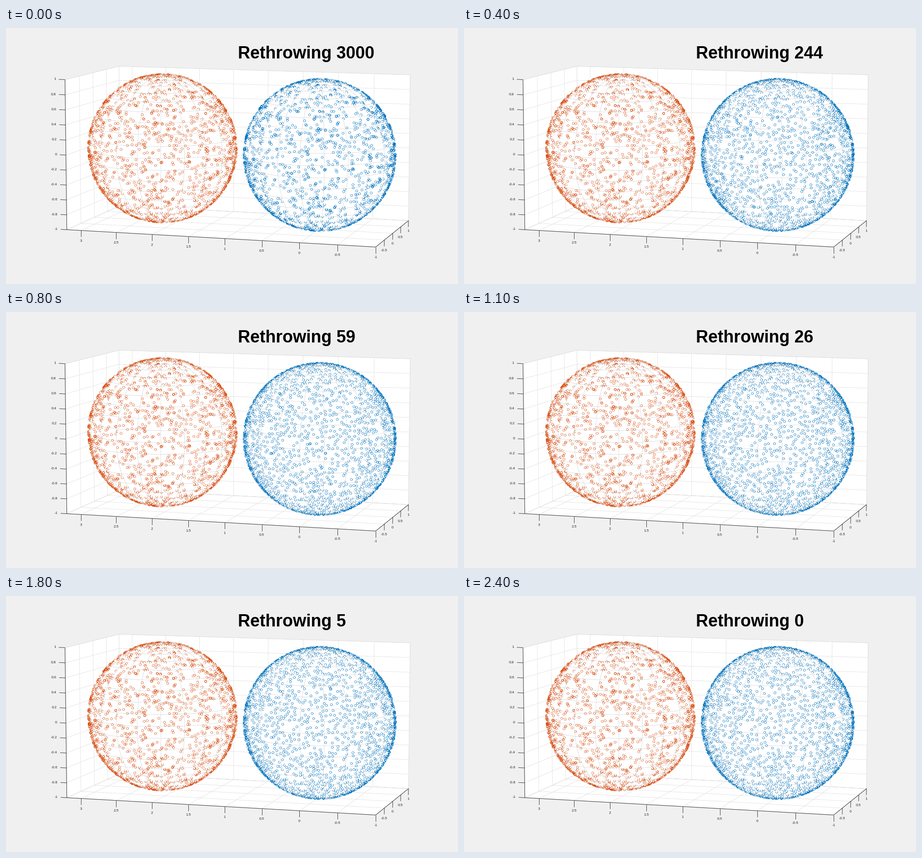
Write a matplotlib script that moves like this. It is 994 by 563 pixels and loops after 2.5 s.

```python
import numpy as np
import matplotlib.pyplot as plt
from matplotlib.animation import FuncAnimation
from matplotlib.collections import LineCollection, PolyCollection

W, H, DPI = 994, 563, 64
PX = 72 / DPI  # one pixel in points
INK, GRID, MESH = "#262626", "#dfdfdf", "#dcdcdc"
ORANGE, BLUE = "#d95319", "#0072bd"
X_MIN, X_MAX = -1, 3.2
MARKER, MARKER_LW = 2.45, 0.66
SINK = 0.997  # keeps the ball's facets just behind the markers
N = 3000
# Points thrown again at each step
COUNTS = [N, 1004, 525, 351, 244, 169, 119, 84, 59, 44, 34, 26, 20,
          15, 12, 9, 7, 6, 5, 4, 3, 2, 2, 1, 0]

# x, y, z of known places in the box and where they sit on the stage
ANCHORS = [
    (3, -1, -1, 164, 445), (2, -1, -1, 321, 453.6), (1, -1, -1, 480.8, 462.5),
    (0, -1, -1, 644.6, 471.7), (-1, -1, -1, 812.3, 481.2), (-1, 0, -1, 850, 451),
    (-1, 1, -1, 884.5, 423.2), (3.2, -1, -1, 133.2, 443), (3.2, -1, 0, 131.2, 278.3),
    (3.2, -1, 1, 129.2, 113.5), (3.2, 1, 1, 248, 83.5), (2, 1, 1, 425, 88.7),
    (1, 1, 1, 576, 93.2), (0, 1, 1, 730, 97.8), (-1, 1, 1, 889, 102.5),
    (0, 0, 0, 689.8, 278.4), (2.2, 0, 0, 344, 264.3),
]

plt.rcParams["path.simplify"] = False
plt.rcParams["font.family"] = "Liberation Sans"


def solve_camera(anchors):
    """Least-squares perspective matrix (3 x 4)."""
    rows, rhs = [], []
    for x, y, z, u, v in anchors:
        rows.append([x, y, z, 1, 0, 0, 0, 0, -u * x, -u * y, -u * z])
        rows.append([0, 0, 0, 0, x, y, z, 1, -v * x, -v * y, -v * z])
        rhs += [u, v]
    sol = np.linalg.lstsq(np.array(rows, float), np.array(rhs, float), rcond=None)[0]
    return np.append(sol, 1).reshape(3, 4)


CAM = solve_camera(ANCHORS)
LENS_INV = np.linalg.inv(CAM[:, :3])
EYE = -LENS_INV @ CAM[:, 3]


def project(p):
    h = np.asarray(p, float) @ CAM[:, :3].T + CAM[:, 3]
    return h[..., :2] / h[..., 2:]


# --- points ---------------------------------------------------------------
rng = np.random.default_rng(11)


def throw(n):
    v = rng.normal(size=(n, 3))
    return v / np.linalg.norm(v, axis=1, keepdims=True)


def relax():
    """Keep the loosest points and throw the most crowded ones again."""
    pts = throw(N)
    steps = [pts]
    for m, n in zip(COUNTS, COUNTS[1:]):
        pts = pts.copy()
        active = pts[N - m:]
        crowd = np.tril(active @ pts.T, k=N - m - 1).max(axis=1)
        pts[N - m:] = active[np.argsort(crowd)]
        pts[N - n:] = throw(n)
        steps.append(pts)
    return steps


def facet_radius(p):
    """Distance from the centre to the faceted ball in each direction."""
    a, b = np.pi / 10, np.pi / 20
    lon, lat = np.arctan2(p[:, 1], p[:, 0]), np.arcsin(np.clip(p[:, 2], -1, 1))
    k = np.cos(a / 2) / np.cos(lon % a - a / 2)
    return np.hypot(np.cos(lat) * k, np.sin(lat)) * np.cos(b / 2) / np.cos(lat % b - b / 2)


def rings(pts, centre):
    """Marker outlines on the stage, cut where the ball covers them."""
    ang = np.linspace(0, 2 * np.pi, 15)
    off = MARKER * np.stack([np.cos(ang), np.sin(ang)], axis=1)
    depth = (pts + centre) @ CAM[2, :3] + CAM[2, 3]
    q = pts[:, None] + depth[:, None, None] * (off @ LENS_INV[:, :2].T)
    eye = EYE - centre
    ray = q - eye
    a, b = (ray ** 2).sum(-1), ray @ eye
    disc = b ** 2 - a * (eye @ eye - (SINK * facet_radius(pts)[:, None]) ** 2)
    hit = (-b - np.sqrt(np.maximum(disc, 0))) / a
    xy = project(q + centre)
    xy[(disc > 0) & (hit < 1)] = np.nan
    gap = np.full((len(pts), 1, 2), np.nan)
    return np.concatenate([xy, gap], axis=1).reshape(-1, 2).T


# --- scene ----------------------------------------------------------------
fig = plt.figure(figsize=(W / DPI, H / DPI), dpi=DPI, facecolor="#f0f0f0")
ax = fig.add_axes([0, 0, 1, 1])
ax.set_xlim(-0.5, W - 0.5)
ax.set_ylim(H - 0.5, -0.5)
ax.axis("off")


def add_lines(segs, color, width, z):
    ax.add_collection(LineCollection(segs, colors=color, linewidths=width * PX, zorder=z))


def add_polys(polys, face, edge, width, z):
    ax.add_collection(PolyCollection(polys, facecolors=face, edgecolors=edge,
                                     linewidths=width * PX, zorder=z))


def label(x, y, value, ha="center"):
    ax.text(x, y, f"{value:g}", size=8 * PX, color=INK, ha=ha, va="center")


def draw_box():
    xs = np.arange(-1, 3.01, 0.5)
    ys = np.arange(-1, 1.01, 0.5)
    zs = np.arange(-5, 6) / 5
    lo, hi = X_MIN, X_MAX
    walls = [
        [(lo, 1, -1), (hi, 1, -1), (hi, 1, 1), (lo, 1, 1)],
        [(hi, -1, -1), (hi, 1, -1), (hi, 1, 1), (hi, -1, 1)],
        [(lo, -1, -1), (hi, -1, -1), (hi, 1, -1), (lo, 1, -1)],
    ]
    add_polys([project(w) for w in walls], "white", GRID, 0.8, 1)
    grid = []
    for x in xs:
        grid += [[(x, -1, -1), (x, 1, -1)], [(x, 1, -1), (x, 1, 1)]]
    for y in ys:
        grid += [[(lo, y, -1), (hi, y, -1)], [(hi, y, -1), (hi, y, 1)]]
    for z in zs:
        grid += [[(lo, 1, z), (hi, 1, z)], [(hi, -1, z), (hi, 1, z)]]
    add_lines([project(g) for g in grid], GRID, 0.8, 2)

    axes = [[(hi, -1, -1), (lo, -1, -1)], [(lo, -1, -1), (lo, 1, -1)],
            [(hi, -1, -1), (hi, -1, 1)]]
    ticks = [project(a) for a in axes]
    for x in xs:
        p = project((x, -1, -1))
        ticks.append([p, p + (0, 14)])
        label(p[0] - 0.2, p[1] + 23, x)
    for y in ys[1:]:
        p = project((lo, y, -1))
        ticks.append([p, p + (-0.3, 14)])
        label(p[0] - 0.3, p[1] + 23, y)
    for z in zs:
        p = project((hi, -1, z))
        ticks.append([p, p + (-13.5, -0.7)])
        label(p[0] - 19.8, p[1] - 0.8, z, ha="right")
    add_lines(ticks, INK, 0.9, 3)


def draw_ball(centre):
    lon, lat = np.meshgrid(np.linspace(-np.pi, np.pi, 21),
                           np.linspace(-np.pi / 2, np.pi / 2, 21))
    v = np.stack([np.cos(lat) * np.cos(lon), np.cos(lat) * np.sin(lon), np.sin(lat)], axis=-1)
    quads = np.stack([v[:-1, :-1], v[:-1, 1:], v[1:, 1:], v[1:, :-1]], axis=2).reshape(-1, 4, 3)
    normal = np.cross(quads[:, 2] - quads[:, 0], quads[:, 3] - quads[:, 1])
    mid = quads.mean(axis=1)
    normal *= np.sign((normal * mid).sum(1, keepdims=True))
    front = (normal * (EYE - centre - mid)).sum(1) > 0
    faces = project(quads[front] + centre)
    add_polys(faces, "white", "white", 0.6, 4)
    add_polys(faces, "none", MESH, 0.6, 4.5)


def add_rings(pts, centre, color):
    return ax.plot(*rings(pts, centre), color=color, lw=MARKER_LW * PX, zorder=5)[0]


steps = relax()
LEFT, RIGHT = np.array([2.2, 0, 0]), np.zeros(3)
draw_box()
draw_ball(LEFT)
draw_ball(RIGHT)
add_rings(steps[0], LEFT, ORANGE)
moving = add_rings(steps[0], RIGHT, BLUE)
title = ax.text(509.3, 66.5, "", size=37.5 * PX, weight="bold", color="black",
                ha="left", va="baseline", zorder=6)


def update(i):
    moving.set_data(*rings(steps[i], RIGHT))
    title.set_text(f"Rethrowing {COUNTS[i]}")
    return moving, title


anim = FuncAnimation(fig, update, frames=len(COUNTS), interval=100, repeat=True)
plt.show()
```
